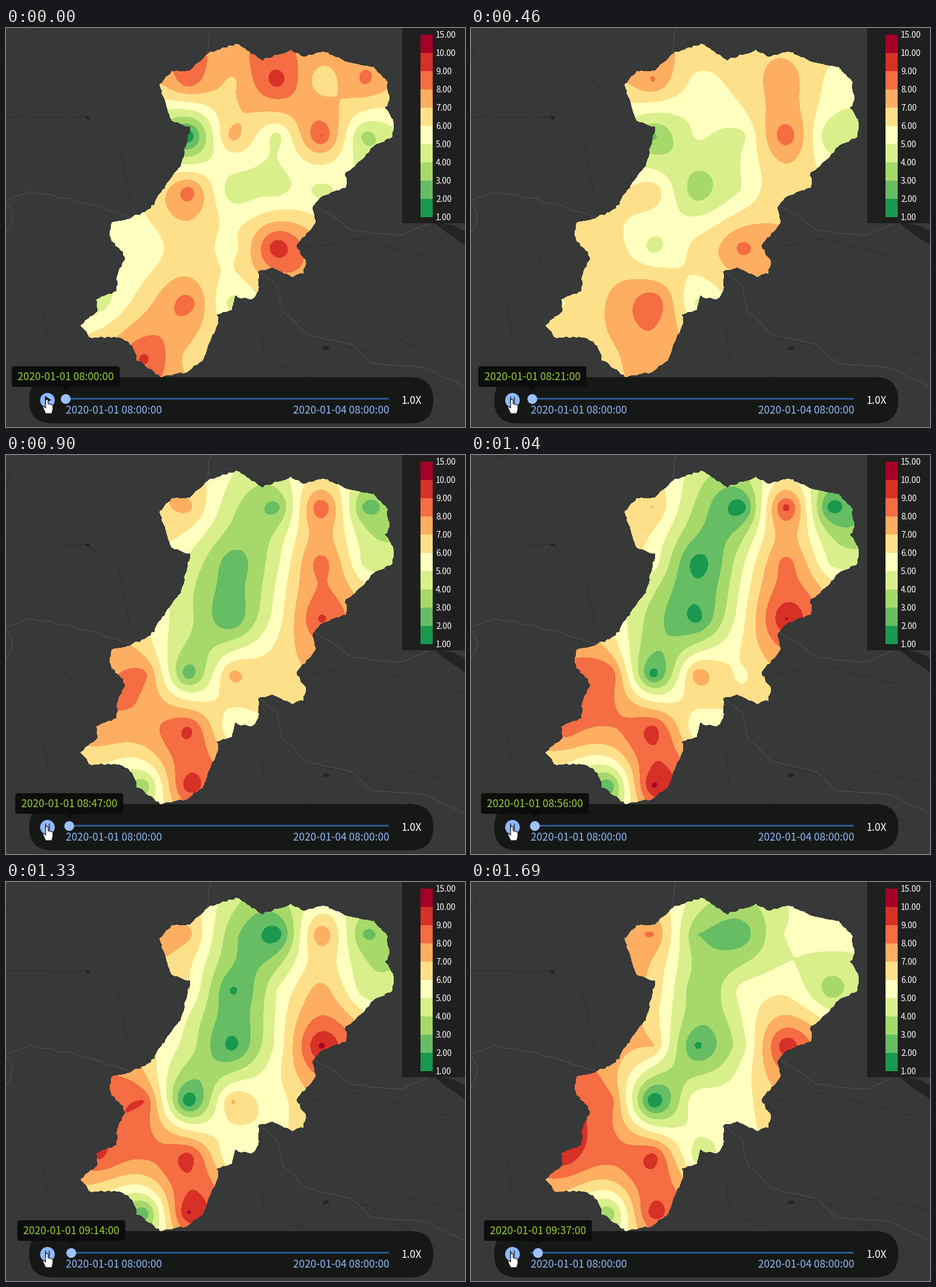
A matplotlib script for the animation above (1.72 s loop, 753 by 656 pixels).

```python
import numpy as np
import matplotlib.pyplot as plt
from matplotlib.animation import FuncAnimation
from matplotlib.collections import LineCollection
from matplotlib.patches import Circle, FancyBboxPatch, Polygon, Rectangle
from matplotlib.path import Path

W, H, DPI = 753, 656, 64
PT = 72 / DPI                       # points per pixel
LOOP, TICK = 1720, 10

plt.rcParams["font.family"] = ["Noto Sans CJK JP", "Liberation Sans"]

PALETTE = ["#1a9850", "#66bd63", "#a6d96a", "#d9ef8b", "#ffffbf",
           "#fee08b", "#fdae61", "#f46d43", "#d73027", "#a50026"]
LAND, ROAD, STREAM, LAKE = "#373838", "#4a4b4b", "#2d2e2e", "#222323"
PANEL, TIP, BLUE, TRACK = "#151715", "#0c0d0b", "#9cc2fc", "#2b5690"

# the clock: time in ms, minutes shown, refreshes until the next key
CLOCK = [(0, 0, 1), (60, 1, 10), (460, 21, 6), (710, 36, 5), (900, 47, 8),
         (1190, 65, 9), (1500, 86, 5), (1690, 97, 1)]

# grid stations as (first column, count) per row, readings moving linearly
ROWS = [(2, 5), (2, 5), (2, 4), (1, 4), (0, 4), (1, 2)]
READINGS = {
    0: [8.8, 6.8, 9.6, 6.3, 8.3, 1.0, 7.5, 4.6, 9.1, 3.5, 8.7, 4.3,
        4.7, 4.7, 5.0, 6.5, 5.6, 9.9, 4.4, 6.6, 8.6, 4.5, 9.3, 6.6],
    60: [6.9, 3.5, 0.6, 9.8, 0.9, 5.9, 0.9, 4.8, 8.4, 4.9, 3.1, 1.4,
         5.7, 10.5, 9.3, 1.0, 7.9, 5.5, 8.9, 8.0, 9.6, 5.2, 1.5, 10.5],
    97: [8.1, 3.0, 2.3, 5.1, 5.6, 6.7, 3.2, 5.4, 5.8, 3.3, 7.1, 1.7,
         4.5, 9.9, 8.7, 0.8, 6.0, 5.6, 9.7, 8.3, 9.5, 4.4, 3.1, 9.6],
}
REACH = 130                         # how far a station is felt, in pixels

# main capes and bays; the small bumps between them are seeded
COAST = [(377, 26), (420, 52), (467, 37), (491, 47), (522, 38), (556, 54),
         (603, 65), (625, 88), (629, 122), (622, 131), (635, 152), (635, 178),
         (604, 192), (581, 219), (558, 237), (557, 263), (518, 276),
         (503, 291), (509, 318), (477, 357), (492, 386), (488, 403),
         (471, 409), (437, 393), (414, 401), (413, 436), (403, 447),
         (375, 441), (371, 463), (347, 471), (346, 492), (322, 546),
         (297, 566), (255, 574), (214, 545), (208, 523), (187, 508),
         (137, 509), (123, 488), (150, 465), (147, 446), (182, 432),
         (182, 407), (197, 378), (171, 345), (172, 319), (204, 313),
         (237, 297), (262, 258), (289, 222), (302, 163), (270, 153),
         (252, 93), (272, 72), (303, 69), (330, 42)]

ROADS = [[(0, 283), (38, 269), (105, 281), (210, 313)],
         [(0, 283), (12, 310), (0, 336)],
         [(503, 288), (568, 333), (650, 341), (692, 322)],
         [(418, 402), (446, 424), (455, 466), (496, 506), (566, 520),
          (598, 550), (690, 560), (753, 590)],
         [(336, 0), (330, 42)]]
STREAMS = [[(0, 48), (15, 16), (62, 0)],
           [(0, 147), (130, 147), (186, 185), (202, 280)],
           [(112, 40), (200, 85), (268, 190)],
           [(75, 335), (115, 380), (58, 462), (68, 515)],
           [(485, 440), (575, 472), (660, 520), (753, 540)],
           [(419, 490), (424, 545), (500, 574)],
           [(496, 506), (600, 534), (753, 630)],
           [(490, 362), (580, 346), (753, 392)]]

rng = np.random.default_rng(4)


def rough(pts, step=5, amp=1.6):
    """Split a polyline into short pieces and shake every new point."""
    pts = np.array(pts, float)
    out = []
    for a, b in zip(pts[:-1], pts[1:]):
        n = max(1, int(np.hypot(*(b - a)) / step))
        out += [a + (b - a) * k / n + rng.uniform(-amp, amp, 2)
                for k in range(n)]
    return np.array(out + [pts[-1]])


def influence(p, q):
    d = np.hypot(p[:, None, 0] - q[None, :, 0], p[:, None, 1] - q[None, :, 1])
    return np.exp(-d / REACH)


# pixels inside the district and their interpolation basis (ordinary kriging)
gy, gx = np.mgrid[0:H, 0:W]
pixels = np.column_stack([gx.ravel(), gy.ravel()]) + 0.5
inside = Path(rough(COAST + COAST[:1])).contains_points(pixels)
spots = pixels[inside]
inside = inside.reshape(H, W)

stations = np.array([(153.5 + 72.7 * (c + k), 86 + 91.5 * r)
                     for r, (c, n) in enumerate(ROWS) for k in range(n)])
count = len(stations)
basis = np.hstack([influence(spots, stations), np.ones((len(spots), 1))])
basis = basis.astype(np.float32)
system = np.ones((count + 1, count + 1))
system[:count, :count] = influence(stations, stations)
system[count, count] = 0
solver = np.linalg.inv(system)
rgba = np.array([[int(c[i:i + 2], 16) for i in (1, 3, 5)] + [255]
                 for c in PALETTE], np.uint8)


def heatmap(minute):
    now = [np.interp(minute, list(READINGS), v) for v in zip(*READINGS.values())]
    weights = solver @ np.append(now, 0)
    field = basis @ weights.astype(np.float32)
    img = np.zeros((H, W, 4), np.uint8)
    img[inside] = rgba[np.clip(field.astype(int), 1, 10) - 1]
    return img


key_ms, key_min, steps = zip(*CLOCK)
starts = np.concatenate([np.linspace(a, b, n, endpoint=False) for a, b, n
                         in zip(key_ms, key_ms[1:] + (LOOP,), steps)])
starts = np.round(starts, -1)

fig = plt.figure(figsize=(W / DPI, H / DPI), dpi=DPI, facecolor=LAND)
ax = fig.add_axes([0, 0, 1, 1])
ax.axis("off")


def lines(paths, color, width):
    ax.add_collection(LineCollection([rough(p, 14) for p in paths],
                                     colors=color, linewidths=width * PT))


def label(x, y, s, size, color, z=6):
    return ax.text(x, y, s, fontsize=size * PT, color=color, zorder=z)


def box(x, y, w, h, r, color, z):
    return ax.add_patch(FancyBboxPatch(
        (x, y), w, h, fc=color, ec="none", zorder=z, alpha=0.97,
        boxstyle=f"round,pad=0,rounding_size={r}"))


def shape(pts, color, z, **kw):
    return ax.add_patch(Polygon(pts, fc=color, zorder=z, **kw))


# base map
lines(STREAMS, STREAM, 1.1)
lines(ROADS, ROAD, 1.4)
shape([(128, 146), (135, 145), (139, 149), (133, 150)], LAKE, 2)
shape([(519, 525), (528, 523), (531, 528), (521, 530)], LAKE, 2)
shape([(700, 318), (735, 325), (753, 334), (753, 357), (722, 336)], LAKE, 2)
heat = ax.imshow(heatmap(0), extent=(0, W, H, 0), aspect="auto",
                 interpolation="nearest", zorder=3)

# legend
ax.add_patch(Rectangle((650, 0), 103, 321, fc="#1e1f1e", zorder=4))
for k, color in enumerate(reversed(PALETTE)):
    ax.add_patch(Rectangle((680, 11 + 30 * k), 20, 30, fc=color, zorder=5,
                           antialiased=False))
for k, level in enumerate([15, *range(10, 0, -1)]):
    label(705, 16.5 + 30 * k, f"{level:.2f}", 13.5, "white")

# player bar
box(38, 574, 663, 76, 37.9, PANEL, 4)
ax.add_patch(Rectangle((98, 608), 530, 3, fc=TRACK, zorder=5))
label(98, 634, "2020-01-01 08:00:00", 17, "#8dbafc")
label(471, 634, "2020-01-04 08:00:00", 17, "#8dbafc")
label(648.5, 618, "1.0X", 17, "white")

ax.add_patch(Circle((68, 612), 12, fc="#8fb8fb", zorder=6))
play = shape([(64, 605), (64, 618), (74, 611.5)], PANEL, 7)
pause = ax.plot([65.5, 65.5, np.nan, 71, 71], [606, 617, np.nan, 606, 617],
                color="#3c4a6b", lw=2 * PT, zorder=7, solid_capstyle="butt")[0]
knob = ax.add_patch(Circle((98, 610), 8, fc=BLUE, zorder=7))

tip = box(9.5, 556, 177, 34, 4, TIP, 8)
arrow = shape([(92, 590), (104, 590), (98, 596)], TIP, 6)
stamp = label(19, 579, "", 17, "#9acd32", 9)

# pointing hand
shape([(65, 612), (67, 610), (69, 612), (69, 618), (75, 619), (77, 621),
       (77, 627), (75, 634), (65, 634), (60, 623), (62, 622), (65, 625)],
      "white", 10, ec="black", lw=PT)

ax.set_xlim(0, W)
ax.set_ylim(H, 0)


def update(i):
    start = starts[starts <= i * TICK].max()
    minute = int(round(np.interp(start, key_ms, key_min)))
    shift = minute * 530 / (72 * 60)
    heat.set_data(heatmap(minute))
    knob.center = (98 + shift, 610)
    tip.set_x(9.5 + shift)
    arrow.set_xy([(92 + shift, 590), (104 + shift, 590), (98 + shift, 596)])
    stamp.set_x(19 + shift)
    stamp.set_text(f"2020-01-01 {8 + minute // 60:02d}:{minute % 60:02d}:00")
    play.set_visible(start == 0)
    pause.set_visible(start > 0)
    return heat, knob, tip, arrow, stamp, play, pause


anim = FuncAnimation(fig, update, frames=LOOP // TICK, interval=TICK,
                     repeat=True, repeat_delay=0, blit=False)
plt.show()
```
